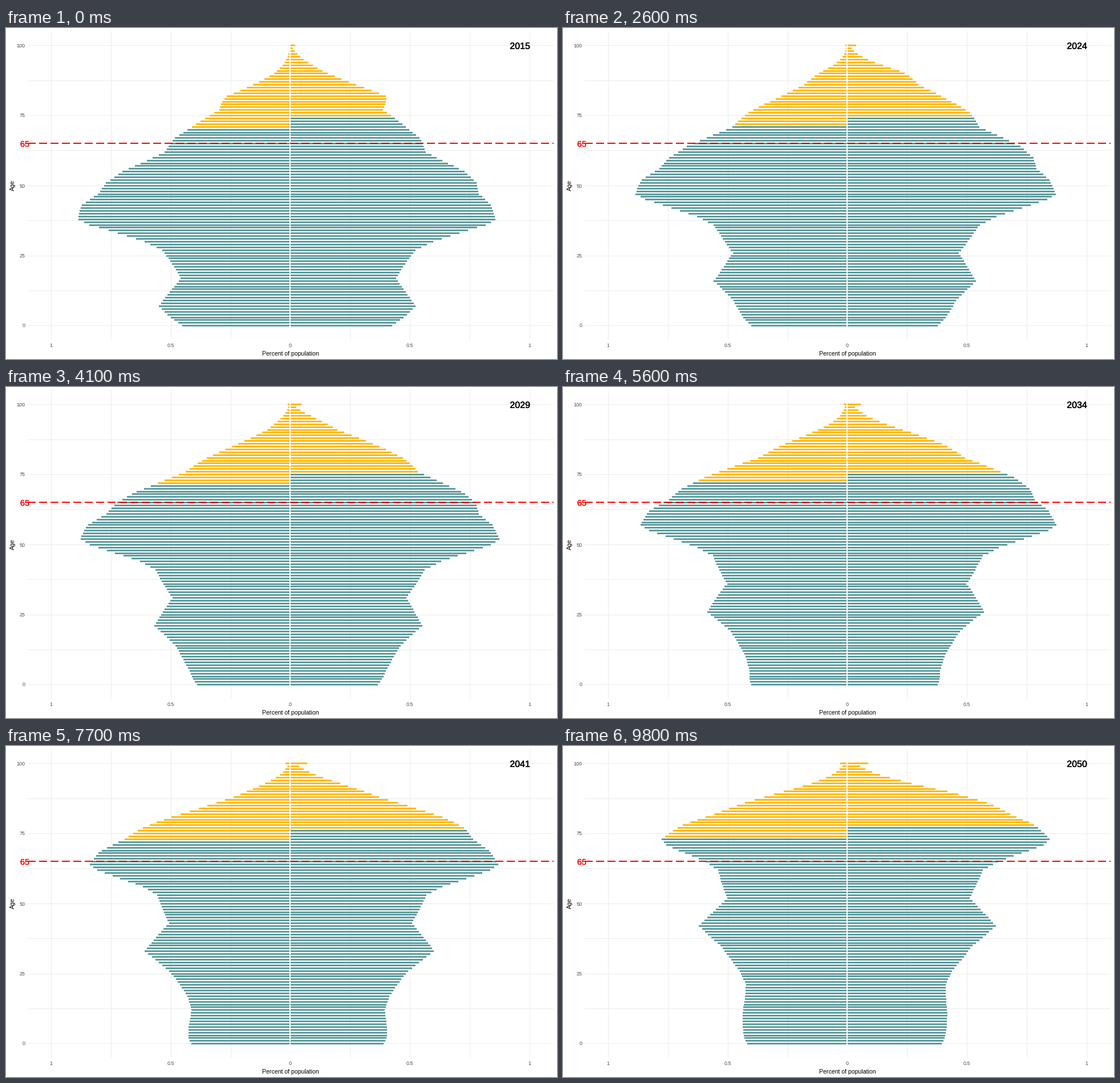
A matplotlib script for the animation above (10 s loop, 966 by 580 pixels).

```python
import matplotlib.pyplot as plt
import numpy as np
from matplotlib.animation import FuncAnimation
from matplotlib.collections import PolyCollection
from matplotlib.patches import Rectangle
from matplotlib.patheffects import withStroke

W, H, DPI = 966, 580, 100
X0, Y0 = 498, 521.75           # pixel position of 0 % and of age 0
UNIT, STEP = 419.7, 540 / 110  # pixels per percent and per year of age
TEAL, GOLD, GRID, RED = "#5D9C9E", "#FFB90F", "#EBEBEB", "#FF0000"
FONT = "Liberation Sans"
AGES = np.arange(101)

# Cohort size in pixels against age in 2015 (negative: not yet born).
COHORT_AGE = [-35, -24, -14, -9, 0, 7, 17, 27, 30, 36, 38,
              43, 47, 51, 55, 62, 67, 77, 82, 90, 100]
COHORT_SIZE = [176, 174, 164, 169, 190, 220, 180, 200, 223, 295, 307,
               297, 278, 274, 256, 200, 193, 149, 172, 114, 95]


def women_at(k):
    """Bar lengths k years after 2015: cohort, births, migration, mortality."""
    size = np.interp(AGES - k, COHORT_AGE, COHORT_SIZE)
    infants = 1 - 0.06 * np.exp(-AGES / 3)
    migration = 1 + 0.2 / (1 + np.exp((27 - AGES) / 6))
    survival = np.exp(-0.24 * np.exp(0.16 * (AGES - 83 - 0.05 * k)))
    out = size * infants * migration * survival
    out[100] = 9 + 0.8 * k     # open-ended group
    return out


def men_per_woman(k):
    birth = 1.055 - 0.0013 * AGES
    surplus = 1 + 0.045 * np.exp(-((AGES - k - 43) / 8) ** 2)
    survival = np.exp(-0.3 * np.exp(0.095 * (AGES - 0.2 * k - 80)))
    return birth * surplus * survival


def row(age):
    return int(Y0 - STEP * age)


def bars(size, side):
    verts = []
    for age, length in zip(AGES, np.maximum(np.round(size), 1)):
        end, top = X0 + side * length, row(age) - 1
        verts.append([(X0, top), (end, top), (end, top + 3), (X0, top + 3)])
    return verts


def year_at(n):
    """Years pass every 300 ms at first, every 200 ms from 8600 ms on."""
    t = n * 100
    return (t + 100) // 300 if t < 8600 else 29 + (t - 8600) // 200


fig = plt.figure(figsize=(W / DPI, H / DPI), dpi=DPI, facecolor="white")
ax = fig.add_axes([0, 0, 1, 1])
ax.set_xlim(0, W)
ax.set_ylim(H, 0)
ax.axis("off")


def rect(x, y, w, h, color, z):
    ax.add_patch(Rectangle((x, y), w, h, fc=color, lw=0, antialiased=False,
                           zorder=z))


def label(x, y, s, px, color="black", ha="center", bold=0, **kw):
    fx = [withStroke(linewidth=bold, foreground=color)] if bold else None
    return ax.text(x, y, s, fontsize=px * 72 / DPI, color=color, ha=ha,
                   va="center", family=FONT, path_effects=fx, zorder=6, **kw)


for v in np.arange(-1, 1.1, 0.25):
    if v:
        rect(int(X0 + 1 + UNIT * v), 5, 1, 541, GRID, 1)
for age in np.arange(0, 101, 12.5):
    rect(38, row(age), 922, 1, GRID, 1)
rect(X0 - 1, 5, 2, 541, "white", 4)
for x in range(38, 960, 20):
    rect(x, row(65) - 1, min(14, 960 - x), 2, RED, 5)

for v in (-1, -0.5, 0, 0.5, 1):
    label(X0 + 0.5 + UNIT * v, 556.5, f"{abs(v):g}", 9, "#4D4D4D")
for age in range(0, 101, 25):
    label(33.5, row(age) + 1, str(age), 9, "#4D4D4D", ha="right")
label(498.5, 570.5, "Percent of population", 10.5)
label(12, 276, "Age", 10.5, rotation=90)
label(33, 204, "65", 14.5, RED, bold=0.2)
year = label(901, 32.3, "2015", 16, bold=0.3)

men, women = (PolyCollection([], linewidths=0, antialiaseds=False, zorder=3)
              for _ in range(2))
ax.add_collection(men, autolim=False)
ax.add_collection(women, autolim=False)


def draw(n):
    k = year_at(n)
    size = women_at(k)
    men.set_verts(bars(size * men_per_woman(k), -1))
    women.set_verts(bars(size, 1))
    # the old-age limit rises by about one year per decade
    for part, limit in ((men, 70.8 + 0.1 * k), (women, 74.6 + 0.09 * k)):
        part.set_facecolor([GOLD if a >= round(limit) else TEAL for a in AGES])
    year.set_text(str(2015 + k))
    return men, women, year


anim = FuncAnimation(fig, draw, frames=100, interval=100, repeat=True,
                     repeat_delay=0, blit=False)
plt.show()
```
